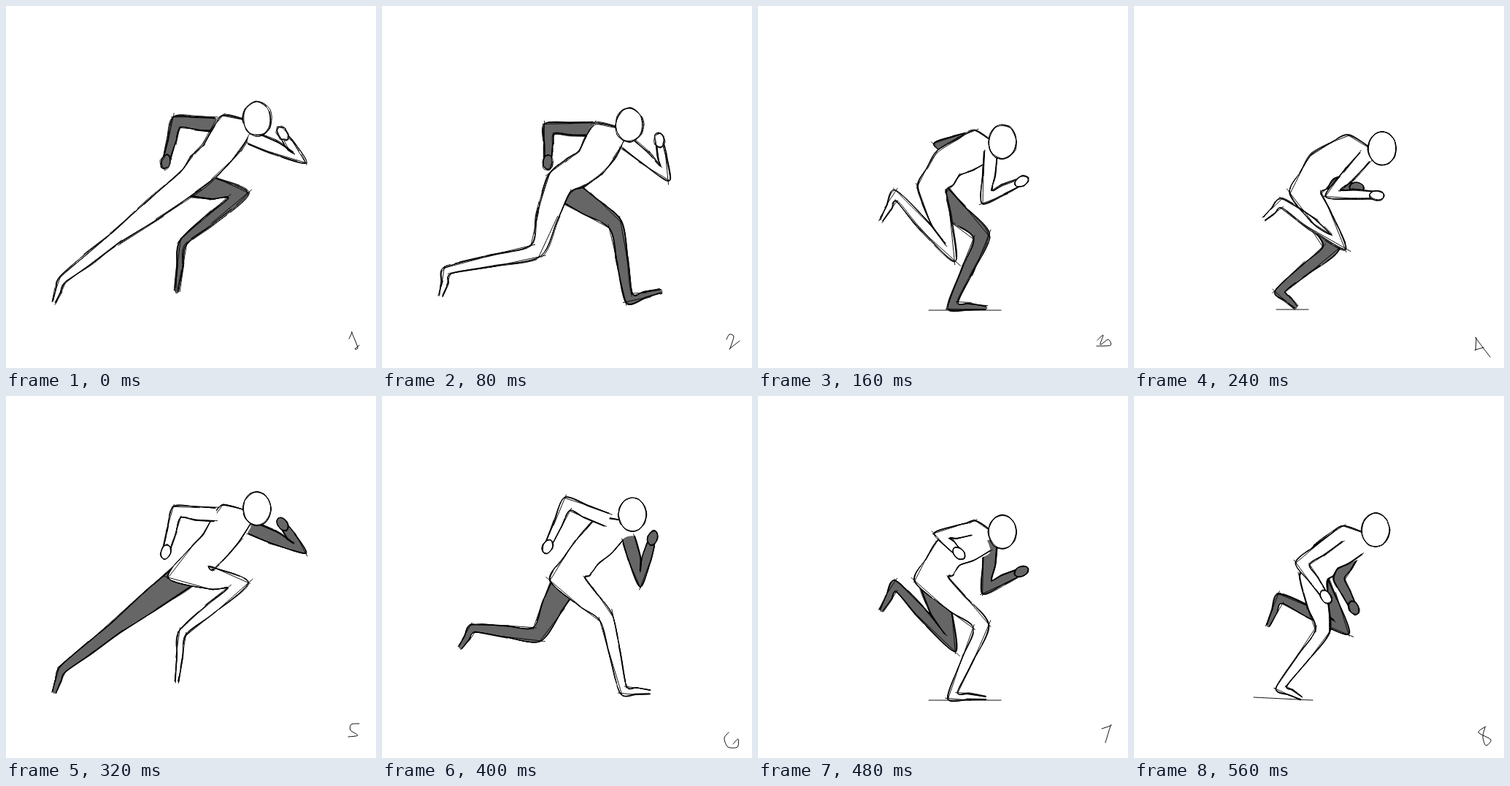
These frames come from a looping animation (507x495 px, 640 ms). An HTML page:

```html
<!DOCTYPE html>
<html lang="en">
<head>
<meta charset="utf-8">
<title>Run cycle</title>
<style>
  html, body { margin: 0; width: 100%; height: 100%; overflow: hidden; background: #fff; }
  svg { display: block; width: 507px; height: 495px; }
  path { fill: none; stroke: #000; stroke-width: .95; stroke-linecap: round; stroke-linejoin: round; }
  .near { fill: #fff; stroke: none; }
  .far { fill: #666; stroke: none; }
  .pose { visibility: hidden; animation: show 640ms step-end infinite; animation-delay: calc(var(--i) * 80ms); }
  @keyframes show { 0% { visibility: visible; } 12.5%, 100% { visibility: hidden; } }
</style>
</head>
<body>
<svg id="stage" viewBox="0 0 507 495"></svg>
<script>
// Joints: spine = chest, waist, hip; arm = shoulder, elbow, hand; leg = knee, ankle, toe.
const push = {
  head: '344,154', spine: '316,162 287,204 250,241',
  near: { arm: '336,180 402,208 379,175', leg: '150,317 77,374 66,405' },
  far: { arm: '286,162 234,159 219,213', leg: '318,259 242,324 234,390' }
};
const land = {
  head: '339,163', spine: '312,173 285,214 242,244',
  near: { arm: '335,187 387,229 380,184', leg: '210,335 90,362 81,396' },
  far: { arm: '288,168 229,168 227,214', leg: '320,299 339,400 382,390' }
};
const bend = {
  head: '335,186', spine: '308,191 261,215 238,251', ground: '234,416 333,416',
  near: { arm: '319,200 314,261 361,240', leg: '263,337 189,260 169,293' },
  far: { arm: '290,182 252,191 275,215', leg: '306,315 267,409 312,413' }
};
const lift = {
  head: '340,195', spine: '304,197 258,220 235,256', ground: '195,415 239,415',
  near: { arm: '316,207 273,256 333,259', leg: '280,323 203,270 178,291' },
  far: { arm: '300,215 266,243 305,248', leg: '270,330 200,390 222,412' }
};
const stride = {
  head: '343,162', spine: '313,182 280,215 254,250',
  near: { arm: '308,169 254,148 227,206', leg: '307,303 331,402 367,405' },
  far: { arm: '338,195 354,250 371,194', leg: '212,326 125,318 107,344' }
};
const crouch = {
  head: '331,183', spine: '300,197 263,220 246,250', ground: '164,412 245,416',
  near: { arm: '280,192 231,229 263,275', leg: '258,322 202,398 229,413' },
  far: { arm: '300,215 281,250 301,290', leg: '284,316 201,277 184,314' }
};
const swapSides = pose => ({ ...pose, near: pose.far, far: pose.near });
const cycle = [push, land, bend, lift, swapSides(push), stride, swapSides(bend), crouch];

// Handwritten counter; a repeated point makes a corner.
const digits = [
  '470,455 474,447 474,447 482,467 478,469 484,464',
  '472,456 476,449 482,452 477,468 477,468 490,458',
  '465,457 473,450 469,463 480,456 483,464 464,465',
  '488,480 469,455 469,455 468,470 468,470 479,467',
  '484,448 473,449 472,457 482,464 469,466',
  '475,460 469,468 474,480 487,480 488,469 481,476',
  '471,455 483,451 483,451 476,474',
  '482,452 472,460 489,470 482,478 478,466 481,453'
];

const armWidths = [18, 14, 9];
const legWidths = [36, 18, 10, 5];
const spineWidths = [46, 44];

let seed = 7;
const random = () => (seed = seed * 16807 % 2147483647) / 2147483647;
const spread = size => (random() * 2 - 1) * size;
const parse = text => text.split(' ').map(pair => pair.split(',').map(Number));
const mix = (a, b, t) => a.map((v, k) => v + (b[k] - v) * t);
const direction = (a, b) => {
  const length = Math.hypot(b[0] - a[0], b[1] - a[1]) || 1;
  return [(b[0] - a[0]) / length, (b[1] - a[1]) / length];
};

function curve(points, closed = false) {
  const n = points.length;
  const at = i => points[closed ? (i + n) % n : Math.max(0, Math.min(n - 1, i))];
  const handle = (i, side) => [0, 1].map(k => at(i)[k] + side * (at(i + 1)[k] - at(i - 1)[k]) / 7);
  let d = 'M' + points[0];
  for (let i = 0; i < n - !closed; i++) d += `C${handle(i, 1)} ${handle(i + 1, -1)} ${at(i + 1)}`;
  return d;
}

// Both edges of a tapered chain of joints, mitred where it bends.
function edges(joints, widths) {
  const left = [], right = [];
  const add = ([x, y], [nx, ny], half) => {
    left.push([x + nx * half, y + ny * half]);
    right.push([x - nx * half, y - ny * half]);
  };
  joints.forEach((joint, i) => {
    const next = joints[i + 1];
    const before = direction(joints[i - 1] || joint, i ? joint : next);
    const after = next ? direction(joint, next) : before;
    const [tx, ty] = direction([0, 0], [before[0] + after[0], before[1] + after[1]]);
    const miter = Math.min(1.6, 1 / (tx * after[0] + ty * after[1]));
    add(joint, [-ty, tx], widths[i] / 2 * miter);
    if (next) add(mix(joint, next, .5), [-after[1], after[0]], (widths[i] + widths[i + 1]) * .27);
  });
  return { left, right };
}

function ellipse([cx, cy], rx, ry, angle = 0) {
  return Array.from({ length: 12 }, (_, i) => {
    const x = rx * Math.cos(i * Math.PI / 6), y = ry * Math.sin(i * Math.PI / 6);
    return [cx + x * Math.cos(angle) - y * Math.sin(angle), cy + x * Math.sin(angle) + y * Math.cos(angle)];
  });
}

const svgNode = (name, parent) => parent.appendChild(document.createElementNS('http://www.w3.org/2000/svg', name));

function addPath(group, d, className = '') {
  const path = svgNode('path', group);
  path.setAttribute('d', d);
  path.setAttribute('class', className);
  return path;
}

// Broken, overlapping passes plus a few strays give the pencil look.
function sketch(group, points, rough, closed) {
  for (let pass = 0; pass < 4; pass++) {
    const dx = spread(rough * .5), dy = spread(rough * .5);
    const wobbly = points.map(([x, y]) => [x + dx + spread(rough * .7), y + dy + spread(rough * .7)]);
    const path = addPath(group, curve(wobbly, closed));
    if (pass) path.style.strokeDasharray = `${25 + random() * 50} ${random() * 14}`;
  }
  if (closed) return;
  for (let i = 1; i < points.length; i++) {
    const [a, b] = [mix(points[i - 1], points[i], -.12), mix(points[i - 1], points[i], 1.05)];
    addPath(group, curve([a, b].map(p => p.map(v => v + spread(rough * 1.2)))));
  }
}

function drawShape(group, points, side, rough) {
  addPath(group, curve(points, true), side);
  sketch(group, points, rough, true);
}

function drawChain(group, joints, widths, side, rough, lead = []) {
  const { left, right } = edges(joints, widths);
  addPath(group, curve([...left, ...[...right].reverse()], true), side);
  sketch(group, [...lead, ...left], rough);
  sketch(group, right, rough);
}

function drawArm(group, arm, side, rough) {
  const [shoulder, elbow, hand] = parse(arm);
  const [dx, dy] = direction(elbow, hand);
  drawChain(group, [shoulder, elbow, hand], armWidths, side, rough);
  drawShape(group, ellipse(hand, 10, 6.5, Math.atan2(dy, dx)), side, rough);
}

cycle.forEach((pose, i) => {
  const group = svgNode('g', document.getElementById('stage'));
  group.setAttribute('class', 'pose');
  group.style.setProperty('--i', i);

  const rough = Math.max(.9, 1.7 - i * .2);
  const head = parse(pose.head)[0], spine = parse(pose.spine);
  const neck = mix(spine[0], head, .6);
  drawArm(group, pose.far.arm, 'far', rough);
  drawChain(group, [spine[2], ...parse(pose.far.leg)], legWidths, 'far', rough);
  drawChain(group, [...spine, ...parse(pose.near.leg)], [...spineWidths, ...legWidths], 'near', rough, [neck]);
  drawArm(group, pose.near.arm, 'near', rough);
  drawShape(group, ellipse(head, 19, 23), 'near', rough);
  if (pose.ground) addPath(group, curve(parse(pose.ground)));
  addPath(group, curve(parse(digits[i])));
});
</script>
</body>
</html>
```
